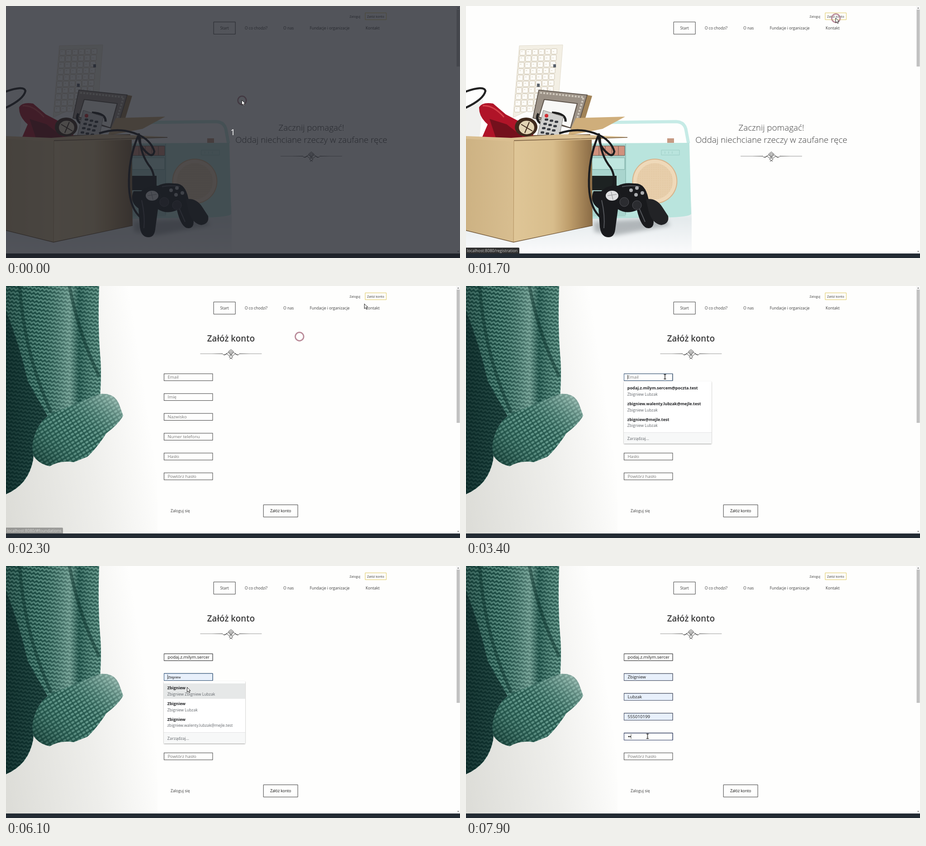
An HTML page for the animation above (8 s loop, 1004 by 558 pixels).

```html
<!DOCTYPE html>
<html lang="pl">
<head>
<meta charset="utf-8">
<title>Załóż konto</title>
<style>
html, body { margin: 0; width: 100%; height: 100%; overflow: hidden; background: #fefefd; }
svg { display: block; width: 1004px; height: 558px; }
text { font: 8.6px "Open Sans", sans-serif; fill: #3c3c3c; }
.mid { text-anchor: middle; }
.small { font-size: 7.05px; }
.lead { font-size: 18.87px; font-weight: 300; }
.title { font-size: 18.9px; font-weight: 600; }
.hint, .value { font-size: 9.65px; fill: #777; }
.value { fill: #161616; }
.preview { font: 7.1px "Liberation Sans", sans-serif; fill: #161616; }
.name { font-size: 9px; font-weight: 700; fill: #202124; }
.sub { font-size: 8.7px; fill: #5f6368; }
.more { font-size: 9.2px; fill: #5f6368; }
.status { font-size: 9px; fill: #c9c9c9; }
.line { fill: none; stroke: #3c3c3c; }
.focus { fill: #fefefd; stroke: #35587e; }
.auto { fill: #e8f0fb; stroke: #3c4660; }
.menu { filter: drop-shadow(0 1px 1px #0006); }
.soft { filter: blur(5px); }

/* 100 ms = 1.25 % */
.a { animation: 8s step-end -20ms infinite; }
#dim { animation-name: dim; }
#register { animation-name: register; }
#linkStatus { animation-name: linkStatus; }
#navStatus { animation-name: navStatus; }
#ring { animation-name: ringMove; }
#pointer { animation-name: pointerMove; }
#arrow { animation-name: arrow; }
#beam { animation-name: beam; }
#mailFocus { animation-name: mailFocus; }
#mailMenu { animation-name: mailMenu; }
#mailTail { animation-name: mailTail; }
#mailHead { animation-name: mailHead; }
#nameFocus { animation-name: nameFocus; }
#nameMenu { animation-name: nameMenu; }
#namePreview, #hover { animation-name: hover; }
#filled { animation-name: filled; }
#passFocus { animation-name: passFocus; }
#passCaret { animation-name: passCaret; }
#dots { animation-name: dots; }
@keyframes dim { 0% { opacity: 1 } 1.25%, to { opacity: 0 } }
@keyframes register { 0% { opacity: 0 } 23.75%, to { opacity: 1 } }
@keyframes linkStatus { 0% { opacity: 0 } 15% { opacity: 1 } 26.25%, to { opacity: 0 } }
@keyframes navStatus { 0% { opacity: 0 } 26.25% { opacity: 1 } 27.5% { opacity: .75 } 28.75% { opacity: .4 } 30%, to { opacity: 0 } }
@keyframes mailFocus { 0% { opacity: 0 } 36.25% { opacity: 1 } 58.75%, to { opacity: 0 } }
@keyframes mailMenu { 0% { opacity: 0 } 38.75% { opacity: 1 } 46.25%, to { opacity: 0 } }
@keyframes mailTail { 0% { opacity: 0 } 46.25% { opacity: 1 } 58.75%, to { opacity: 0 } }
@keyframes mailHead { 0% { opacity: 0 } 58.75%, to { opacity: 1 } }
@keyframes nameFocus { 0% { opacity: 0 } 58.75% { opacity: 1 } 78.75%, to { opacity: 0 } }
@keyframes nameMenu { 0% { opacity: 0 } 61.25% { opacity: 1 } 78.75%, to { opacity: 0 } }
@keyframes hover { 0% { opacity: 0 } 75%, to { opacity: 1 } }
@keyframes filled { 0% { opacity: 0 } 78.75%, to { opacity: 1 } }
@keyframes passFocus { 0% { opacity: 0 } 91.25%, to { opacity: 1 } }
@keyframes passCaret { 0% { opacity: 1 } 96.25%, to { opacity: 0 } }
@keyframes dots { 0% { opacity: 0 } 98.75%, to { opacity: 1 } }
@keyframes arrow { 0% { opacity: 1 } 33.75% { opacity: 0 } 75% { opacity: 1 } 87.5%, to { opacity: 0 } }
@keyframes beam { 0% { opacity: 0 } 33.75% { opacity: 1 } 75% { opacity: 0 } 87.5%, to { opacity: 1 } }
@keyframes ringMove {
  0% { transform: translate(522px, 209px); opacity: 1 }
  1.25% { transform: translate(537px, 207px); animation-timing-function: steps(8) }
  11.25% { transform: translate(792px, 48px); animation-timing-function: steps(5) }
  17.5%, 26.25% { transform: translate(818px, 27px) }
  27.5% { transform: translate(740px, 62px) }
  28.75% { transform: translate(649px, 112px) }
  30% { transform: translate(555px, 162px) }
  31.25% { transform: translate(485px, 200px); animation-timing-function: steps(3) }
  35% { transform: translate(433px, 200px); opacity: 1 }
  37.5%, to { transform: translate(433px, 200px); opacity: 0 }
}
@keyframes pointerMove {
  0% { transform: translate(521px, 208px) }
  1.25% { transform: translate(521px, 208px); animation-timing-function: steps(8) }
  11.25% { transform: translate(780px, 56px); animation-timing-function: steps(6) }
  18.75%, 27.5% { transform: translate(817px, 26px) }
  28.75% { transform: translate(792px, 39px) }
  30% { transform: translate(640px, 118px) }
  31.25% { transform: translate(545px, 168px) }
  32.5% { transform: translate(480px, 204px); animation-timing-function: steps(2) }
  35% { transform: translate(433px, 202px) }
  37.5% { transform: translate(440px, 201px) }
  51.25% { transform: translate(440px, 201px); animation-timing-function: steps(4) }
  56.25% { transform: translate(402px, 251px) }
  73.75% { transform: translate(402px, 251px); animation-timing-function: steps(2) }
  76.25% { transform: translate(400px, 268px) }
  82.5% { transform: translate(400px, 268px); animation-timing-function: steps(5) }
  88.75%, to { transform: translate(401.5px, 377px) }
}
</style>
</head>
<body>
<svg viewBox="0 0 1004 558">
<defs>
  <linearGradient id="boxSide"><stop stop-color="#dfc697"/><stop offset=".5" stop-color="#d8bd8c"/><stop offset=".72" stop-color="#bc9b69"/><stop offset="1" stop-color="#8a6b45"/></linearGradient>
  <linearGradient id="boxFront"><stop stop-color="#cdb283"/><stop offset="1" stop-color="#d8be90"/></linearGradient>
  <linearGradient id="floor" x2="0" y2="1"><stop stop-color="#e4eaec" stop-opacity="0"/><stop offset=".35" stop-color="#e4eaec"/><stop offset="1" stop-color="#fbfbfc"/></linearGradient>
  <linearGradient id="wall" y1="1" y2=".75"><stop stop-color="#dcdcd7"/><stop offset=".6" stop-color="#eeeeeb"/><stop offset="1" stop-color="#fefefd"/></linearGradient>
  <linearGradient id="folds"><stop stop-color="#05211f" stop-opacity=".45"/><stop offset=".35" stop-color="#0b3a34" stop-opacity=".15"/><stop offset=".67" stop-color="#a8cabf" stop-opacity=".4"/><stop offset=".77" stop-color="#0b3a34" stop-opacity=".4"/><stop offset="1" stop-color="#8cbcae" stop-opacity=".15"/></linearGradient>
  <linearGradient id="cuffLight" y1="1" y2="0"><stop stop-color="#06251f" stop-opacity=".65"/><stop offset=".5" stop-color="#3b7a6c" stop-opacity=".1"/><stop offset="1" stop-color="#d5e6df" stop-opacity=".7"/></linearGradient>
  <pattern id="knit" width="9" height="8.5" patternUnits="userSpaceOnUse" patternTransform="rotate(8)">
    <path fill="#1f4f46" d="M0 0H9V8.5H0Z"/><path d="M0 1.5L4.5 6 9 1.5" fill="none" stroke="#64978a" stroke-width="3.2"/>
  </pattern>
  <pattern id="purl" width="9" height="8" patternUnits="userSpaceOnUse" patternTransform="rotate(-32)">
    <path fill="#24554b" d="M0 0H9V8H0Z"/><ellipse cx="4.5" cy="4" rx="3.7" ry="2.5" fill="#6a9d90"/>
  </pattern>
  <pattern id="mesh" width="4" height="4" patternUnits="userSpaceOnUse">
    <path fill="#e8cfac" d="M0 0H4V4H0Z"/><circle cx="2" cy="2" r=".7" fill="#d8b98f"/>
  </pattern>
  <clipPath id="inner"><path d="M357 0H449.7V558H357Z"/></clipPath>
  <g id="ornament" fill="none" stroke="#2a2a2a" stroke-width=".9">
    <path d="M-68-.3H-42L-18-.6V.6L-42 .3H-68ZM68-.3H42L18-.6V.6L42 .3H68Z" fill="#333" stroke="none"/>
    <path d="M0-9.5L6-4.5 0 .5-6-4.5ZM0-6.5L3-4.5 0-2-3-4.5ZM-18 2H-12L-6-3 0 3 6-3 12 2H18M-15 3.5L-10-.5-4 4.5 0 1 4 4.5 10-.5 15 3.5M0 4L4 7 0 10-4 7ZM-3 12L0 9.5 3 12"/>
  </g>
</defs>

<g id="home">
  <path fill="#fefefd" d="M0 0H1004V558H0Z"/>
  <path fill="url(#floor)" d="M0 430H499V548H0Z"/>
  <!-- keyboard -->
  <path fill="#f3efe4" stroke="#e2dccd" d="M118 88L214 86 205 200 104 247Z"/>
  <g id="keys" fill="#fdfcf8" stroke="#c3b8a2" stroke-width=".8"/>
  <path fill="#59616b" d="M193 129H199V136H193ZM157 172H163V179H157Z"/>
  <!-- lamp and telephone -->
  <path fill="#f0f0ee" d="M0 224L38 206 30 291H0Z"/>
  <path fill="none" stroke="#222" stroke-width="4.5" d="M-2 190Q40 175 43 188Q39 207-2 226"/>
  <path fill="#b01428" d="M29 224Q36 212 60 216L88 240 130 262Q150 274 149 290L95 296 36 290 48 262Q28 245 29 224Z"/>
  <path fill="#74101c" d="M52 250L90 262 128 292H66Z"/>
  <path fill="none" stroke="#d7424b" stroke-width="3" d="M37 221Q60 219 84 246"/>
  <!-- compass, frame and remote -->
  <ellipse cx="133" cy="268" rx="25" ry="21" fill="#3f2a1d"/>
  <ellipse cx="134" cy="269" rx="17" ry="15" fill="#e3d5b5"/>
  <path stroke="#3f2a1d" stroke-width="2" d="M122 262L147 277M140 257L130 281"/>
  <path fill="#a28458" d="M262 196L279 199 258 268 240 275Z"/>
  <path fill="#9b9186" stroke="#514840" stroke-width="1.5" d="M161 186L268 197 245 274 148 248Z"/>
  <path fill="none" stroke="#d0c9bd" stroke-width="4" stroke-dasharray="4 3" d="M164 192L260 202 240 268"/>
  <path fill="#f8f8f6" stroke="#5c5249" stroke-width="2" d="M173 207L246 216 231 270 161 246Z"/>
  <path fill="none" stroke="#202020" stroke-width="5" d="M160 238Q152 252 168 262M190 236Q222 238 220 256"/>
  <path fill="#cfcfcd" stroke="#85827e" d="M171 231L215 245 206 291H157Z"/>
  <circle cx="178" cy="243" r="4" fill="#d32b32"/>
  <g id="buttons" fill="#393c42"/>
  <!-- radio -->
  <path fill="none" stroke="#c6ebe6" stroke-width="7" d="M300 258L465 256Q482 257 486 272L492 304"/>
  <path fill="#b9e4dd" d="M276 304L494 303 498 460Q497 466 455 468L276 471Z"/>
  <path fill="#a9d5ce" d="M276 306H353V466H276Z"/>
  <path fill="#d1917d" stroke="#69564e" d="M280 310H351V331H280ZM294 310V331M308 310V331M322 310V331M337 310V331"/>
  <path fill="#bfe6df" stroke="#7baaa3" d="M279 336H351V362H279ZM353 305V462"/>
  <path fill="#1d2222" d="M279 376H333V408H279Z"/>
  <path fill="none" stroke="#9accc4" d="M432 319H472V330H432ZM440 322V327M448 322V327M456 322V327"/>
  <path fill="#c69a83" d="M445 293H460V303H445Z"/>
  <circle cx="417.5" cy="388" r="50" fill="#d6b48c"/>
  <circle cx="417.5" cy="388" r="48" fill="#efd9b9"/>
  <circle cx="417.5" cy="388" r="40" fill="url(#mesh)"/>
  <!-- cardboard box -->
  <path fill="#cfae7b" d="M243 248L352 245 302 272 262 280 225 287Z"/>
  <path fill="#74583a" d="M98 296L150 286 275 284V296Z"/>
  <path fill="url(#boxFront)" d="M0 292L106 296 105 523 0 497Z"/>
  <path fill="url(#boxSide)" d="M106 296H278L280 486 105 523Z"/>
  <path fill="#dabf91" d="M0 288L100 292 210 284 275 286 357 290 280 296 106 300 0 294Z"/>
  <path fill="none" stroke="#705638" stroke-width="1.3" d="M0 497L105 523 280 486M106 298L357 291"/>
  <path fill="none" stroke="#b28f5d" d="M106 299L105 522"/>
  <!-- cable and gamepad -->
  <path class="soft" fill="#83898d" opacity=".55" d="M282 478L440 470 452 486 330 508 284 500Z"/>
  <g fill="none" stroke="#1b1c1e" stroke-width="4.5">
    <path d="M206 282Q250 267 290 284Q320 296 328 322Q325 336 313 326Q291 308 294 282"/>
    <path d="M292 288Q270 340 272 400Q274 450 300 470M296 290Q297 330 320 358Q332 378 324 402"/>
  </g>
  <path fill="#191a1d" d="M299 410Q315 395 336 398Q350 390 372 393Q396 391 403 425L414 470Q418 490 405 492Q388 494 378 452Q355 462 336 450L330 495Q328 512 315 512Q299 512 296 490L293 448Q272 434 282 410Z"/>
  <path fill="#222326" d="M398 428Q420 424 434 445L447 465Q450 482 432 485Q412 482 404 455Z"/>
  <path fill="none" stroke="#53555a" stroke-width="2" d="M300 430Q308 465 305 492M345 400Q365 396 384 400M383 448Q391 466 396 478"/>
  <ellipse cx="323" cy="420" rx="14" ry="11" fill="#dedfe0"/>
  <path stroke="#a5a6a8" stroke-width="1.5" d="M313 420L333 417M321 411L325 429"/>
  <g fill="#2b2c30" stroke="#505156"><circle cx="350" cy="434" r="10"/><circle cx="378" cy="441" r="10"/></g>
  <g fill="#a9abae"><circle cx="365" cy="408" r="4"/><circle cx="378" cy="403" r="4"/><circle cx="376" cy="418" r="4"/><circle cx="390" cy="414" r="4"/></g>
  <text class="lead mid" x="675.2" y="276">Zacznij pomagać!</text>
  <text class="lead mid" x="675.2" y="303">Oddaj niechciane rzeczy w zaufane ręce</text>
  <use href="#ornament" x="675.2" y="332.5"/>
  <path fill="#c1c1c1" d="M996.5 8H1003.5V134H996.5Z"/>
</g>

<g id="register" class="a">
  <path fill="#fefefd" d="M0 0H1004V558H0Z"/>
  <path fill="url(#wall)" d="M0 0H335V548H0Z"/>
  <g id="sweater">
    <path id="body" d="M0 0H206Q203 90 208 150Q212 190 208 245L150 268 95 290Q74 310 62 340L60 385Q50 440 0 461Z" fill="url(#knit)"/>
    <path fill="url(#folds)" d="M0 0H206Q203 90 208 150Q212 190 208 245L150 268 95 290Q74 310 62 340L60 385Q50 440 0 461Z"/>
    <path fill="#061f1e" opacity=".6" d="M0 55Q30 130 48 210L92 288Q66 320 60 385Q48 440 0 461Z"/>
    <path fill="none" stroke="#0c322d" stroke-width="7" opacity=".5" d="M140 0Q162 110 206 200M30 0Q40 150 100 280"/>
    <path fill="url(#purl)" d="M208 239Q240 236 250 262L259 287Q250 305 222 326Q200 360 180 378L150 390Q120 385 97 399Q75 395 62 378Q55 360 62 335Q72 300 98 284Q150 262 208 239Z"/>
    <path fill="url(#cuffLight)" d="M208 239Q240 236 250 262L259 287Q250 305 222 326Q200 360 180 378L150 390Q120 385 97 399Q75 395 62 378Q55 360 62 335Q72 300 98 284Q150 262 208 239Z"/>
  </g>
  <text class="title mid" x="497.5" y="123">Załóż konto</text>
  <use href="#ornament" x="497.5" y="150"/>
  <g id="fields"/>
  <text x="364" y="501">Zaloguj się</text>
  <path class="line" d="M569.3 484.5H645.3V511.5H569.3Z"/>
  <text class="mid" x="607.3" y="501" style="fill:#111">Załóż konto</text>

  <g id="mailFocus" class="a"><path class="line" style="stroke:#35587e" d="M349.5 194.5H457V209.5H349.5Z"/><path stroke="#222" stroke-width=".8" d="M357.5 197V207"/></g>
  <g id="mailTail" class="a">
    <path class="focus" d="M349.5 194.5H457V209.5H349.5Z"/>
    <g clip-path="url(#inner)"><text class="value" x="449.3" y="205.2" text-anchor="end">podaj.z.milym.sercem@poczta.test</text></g>
    <path stroke="#d8483e" stroke-width=".9" stroke-dasharray="1.5 .7" d="M357 207.3H386"/>
  </g>
  <g id="mailHead" class="a">
    <path class="line" style="fill:#fefefd" d="M349.5 194.5H457V209.5H349.5Z"/>
    <g clip-path="url(#inner)"><text class="value" x="357.5" y="205.2">podaj.z.milym.sercem@poczta.test</text></g>
  </g>
  <g id="nameFocus" class="a">
    <path class="line" style="stroke:#35587e" d="M349.5 238H457V253.5H349.5Z"/>
    <g id="namePreview" class="a">
      <path class="auto" style="stroke:#35587e" d="M349.5 238H457V253.5H349.5Z"/>
      <text class="preview" x="358" y="249.2">Zbigniew</text>
    </g>
    <path stroke="#222" stroke-width=".8" d="M357.5 240.5V251"/>
  </g>
  <g id="filled" class="a"/>
  <g id="passFocus" class="a">
    <path class="line" style="stroke:#26345c" d="M349.5 370H457V385.5H349.5Z"/>
    <path id="passCaret" class="a" stroke="#222" stroke-width=".8" d="M357.5 372V383"/>
    <g id="dots" class="a">
      <path class="focus" style="stroke:#26345c" d="M349.5 370H457V385.5H349.5Z"/>
      <circle cx="359.8" cy="377.7" r="1.3"/><circle cx="363" cy="377.7" r="1.3"/>
      <path stroke="#222" stroke-width=".8" d="M365 372V383"/>
    </g>
  </g>
  <g id="mailMenu" class="a"/>
  <g id="nameMenu" class="a"/>
  <path fill="#c1c1c1" d="M996.5 8H1003.5V303H996.5Z"/>
</g>

<g id="chrome">
  <path fill="#f6f6f6" d="M995.5 0H1004V8H995.5Z"/>
  <path fill="#666" d="M998 5.5L1000 3 1002 5.5ZM998 542.5L1000 545 1002 542.5Z"/>
  <path fill="#232b33" d="M0 548H1004V558H0Z"/>
  <text class="small" x="759.7" y="25.5">Zaloguj</text>
  <path class="line" style="stroke:#dfc95f" d="M794.3 15.2H841V30.3H794.3Z"/>
  <text class="small mid" x="817.6" y="25.5">Załóż konto</text>
  <path class="line" d="M459.2 35.3H507.2V62.3H459.2Z"/>
  <text class="mid" x="483.3" y="52">Start</text>
  <text class="mid" x="553" y="52">O co chodzi?</text>
  <text class="mid" x="624.8" y="52">O nas</text>
  <text class="mid" x="715.8" y="52">Fundacje i organizacje</text>
  <text class="mid" x="810.8" y="52">Kontakt</text>
</g>
<g id="linkStatus" class="a">
  <path fill="#303030" d="M0 535H116Q118 535 118 537V548H0Z"/>
  <text class="status" x="2" y="544.8">localhost:8080/registration</text>
</g>
<g id="navStatus" class="a">
  <path fill="#303030" d="M0 535H124Q126 535 126 537V548H0Z"/>
  <text class="status" x="2" y="544.8">localhost:8080/#foundations</text>
</g>
<g id="ring" class="a"><circle r="9.3" fill="none" stroke="#b98a98" stroke-width="2.7"/></g>
<g id="dim" class="a">
  <path fill="#1e2129" opacity=".77" d="M0 0H1004V558H0Z"/>
  <text class="mid" x="501.8" y="285.5" style="font-size:19px;fill:#fff">1</text>
</g>
<g id="pointer" class="a">
  <path id="arrow" class="a" fill="#fff" stroke="#222" stroke-width="1" d="M.5.5V11.2L3 8.9 4.8 12.7 6.6 11.9 4.9 8.2H8Z"/>
  <path id="beam" class="a" fill="none" stroke="#222" stroke-width="1.4" d="M-2.5-5H2.5M0-5V5M-2.5 5H2.5"/>
</g>
</svg>
<script>
const add = (id, markup) => document.getElementById(id).insertAdjacentHTML('beforeend', markup);
const rowY = row => 194.3 + row * 43.9;
const field = (row, text, box, type) =>
  `<rect class="${box}" x="349.5" y="${rowY(row)}" width="107.5" height="15.4"/>
   <text class="${type}" x="357.5" y="${rowY(row) + 11}">${text}</text>`;

['Email', 'Imię', 'Nazwisko', 'Numer telefonu', 'Hasło', 'Powtórz hasło']
  .forEach((label, row) => add('fields', field(row, label, 'line', 'hint')));
['Zbigniew', 'Lubzak', '555010199']
  .forEach((value, i) => add('filled', field(i + 1, value, 'auto', 'value')));

// Autofill list: a bold name and a detail per entry
function menu(id, top, width, entries, hover = '') {
  const rows = entries.map(([name, detail], i) =>
    `<text class="name" x="356.8" y="${top + 18.3 + i * 34.6}">${name}</text>
     <text class="sub" x="356.8" y="${top + 32 + i * 34.6}">${detail}</text>`).join('');
  add(id, `<g class="menu"><rect x="349" y="${top}" width="${width}" height="138" rx="1.5" fill="#fff"/></g>${hover}
    <rect x="349" y="${top + 113}" width="${width}" height="25" fill="#f7f8f8"/>
    <path stroke="#e3e4e5" d="M349 ${top + 113.5}h${width}"/>${rows}
    <text class="more" x="356.8" y="${top + 129.5}">Zarządzaj…</text>`);
}
const person = 'Zbigniew Lubzak', mail = 'zbigniew.walenty.lubzak@mejle.test';
menu('mailMenu', 211, 194, [['podaj.z.milym.sercem@poczta.test', person], [mail, person], ['zbigniew@mejle.test', person]]);
menu('nameMenu', 255, 180, [['Zbigniew', 'Zbigniew ' + person], ['Zbigniew', person], ['Zbigniew', mail]],
  '<rect id="hover" class="a" x="349" y="260" width="180" height="34" fill="#e6e8e8"/>');

// Slanted grids of keys
for (let r = 0; r < 10; r++)
  for (let c = 0; c < 6; c++)
    add('keys', `<rect x="${119 + c * 14 - r * 1.3}" y="${97 + r * 14 - c * .5}" width="12" height="12" rx="1.5"/>
      <path d="M${122 + c * 14 - r * 1.3} ${101 + r * 14}h3"/>`);
for (let r = 0; r < 4; r++)
  for (let c = 0; c < 3; c++)
    add('buttons', `<rect x="${174 + c * 11 - r * 3}" y="${249 + r * 9.5 + c * 2.5}" width="8" height="5" rx="2"/>`);
</script>
</body>
</html>
```
